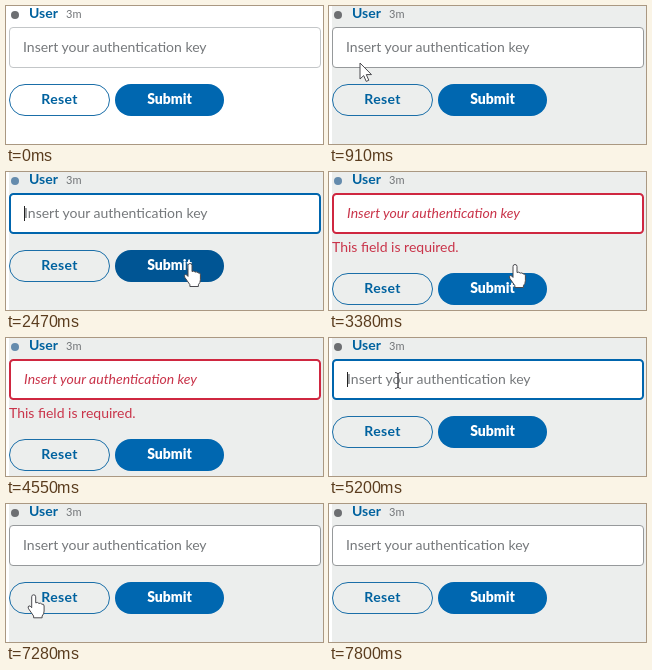
An HTML page for the animation above (8 s loop, 317 by 138 pixels).

```html
<!DOCTYPE html>
<html lang="en">
<head>
<meta charset="utf-8">
<title>Authentication form</title>
<style>
  html, body { margin: 0; width: 100%; height: 100%; overflow: hidden; background: #fff; }
  svg { display: block; font: 14px Lato, sans-serif; }
  .bold { font-weight: 700; fill: #00629f; }
  .mouse path { fill: #fff; stroke: #4a4a4f; stroke-linejoin: round; }
</style>
</head>
<body>
<svg width="317" height="138" viewBox="0 0 317 138">
  <rect id="hover" x="3" width="314" height="138" fill="#eceeed"/>
  <circle id="dot" cx="9" cy="9" r="4"/>
  <text class="bold" x="23" y="12">User</text>
  <text x="60" y="12" font-size="11" fill="#727578">3m</text>

  <rect id="field" fill="#fff"/>
  <text id="hint" y="46">Insert your authentication key</text>
  <path id="caret" d="M18.5 34V49" stroke="#222"/>
  <text id="error" x="3" y="80" fill="#c9344a">This field is required.</text>

  <g id="buttons">
    <rect x="3.5" y="78.5" width="100" height="31" rx="15.5" fill="none" stroke="#1a6ea8"/>
    <text class="bold" x="53.5" y="98" text-anchor="middle" letter-spacing=".3">Reset</text>
    <rect id="submit" x="109" y="78" width="109" height="32" rx="16"/>
    <text x="163.5" y="98" text-anchor="middle" font-weight="900" fill="#fff">Submit</text>
  </g>

  <g id="mouse" class="mouse">
    <path id="arrow" d="M0 0V16L3.7 12.6 6.2 18.4 8.8 17.3 6.3 11.6H11.5Z"/>
    <path id="hand" d="M-2 1.5a2 2 0 0 1 4 0V7.5q2-1 3.2.6 2-.8 3 .8 2.2-.4 2.2 1.8v5q0 3-2 5v1.8h-8.5v-1.8l-5-7.2q-1.2-2.2.3-2.9 1.2-.4 2.8 1.8z"/>
    <path id="beam" d="M-3-8Q0-8 0-6V6Q0 8-3 8M3-8Q0-8 0-6V6Q0 8 3 8" style="fill:none"/>
  </g>
</svg>
<script>
  const LOOP = 8000, STEP = 130;
  const $ = id => document.getElementById(id);
  const within = (t, a, b) => t >= a && t < b;
  const show = (id, on) => $(id).setAttribute('visibility', on ? 'visible' : 'hidden');
  const set = (id, attrs) => {
    for (const key in attrs) $(id).setAttribute(key, attrs[key]);
  };

  // Pointer visits: each row is time, x, y
  const visits = [
    [[520, 8, 118], [910, 31, 57], [1300, 58, 43], [1430, 62, 42], [1820, 62, 42],
     [2470, 184, 92], [2990, 184, 92], [3380, 186, 93], [3770, 186, 93], [4550, 262, -24]],
    [[4680, 110, -24], [5070, 72, 42], [5330, 66, 43], [5980, 66, 43], [6500, 43, 98],
     [7150, 43, 98], [7540, -16, 72]]
  ];

  function pointer(t) {
    const path = visits.find(v => within(t, v[0][0], v[v.length - 1][0]));
    if (!path) return null;
    const i = path.findIndex(k => k[0] > t);
    const [t0, x0, y0] = path[i - 1], [t1, x1, y1] = path[i];
    const p = (t - t0) / (t1 - t0), e = p * p * (3 - 2 * p);
    return [x0 + (x1 - x0) * e, y0 + (y1 - y0) * e];
  }

  function drawField(hovered, focused, failed) {
    const wide = focused || failed, w = wide ? 2 : 1;
    set('field', {
      x: 3 + w / 2, y: 21 + w / 2, width: 312 - w, height: 41 - w, rx: 3.5,
      'stroke-width': w,
      stroke: failed ? '#cf2740' : focused ? '#0065ad' : hovered ? '#96999b' : '#c3c6c8'
    });
    set('hint', {
      x: wide ? 18 : 17,
      fill: failed ? '#c9344a' : '#75787b',
      'font-style': failed ? 'italic' : 'normal'
    });
  }

  function drawMouse(pos) {
    show('mouse', pos);
    if (!pos) return null;
    const [x, y] = pos;
    const button = y < 78 || y > 133 ? null
      : within(x, 3, 104) ? 'reset' : within(x, 109, 218) ? 'submit' : null;
    const kind = button ? 'hand' : within(y, 22, 55) ? 'beam' : 'arrow';
    set('mouse', { transform: `translate(${x.toFixed(1)} ${y.toFixed(1)})` });
    for (const id of ['arrow', 'hand', 'beam'])
      set(id, { display: id === kind ? 'inline' : 'none' });
    return button;
  }

  function render(time) {
    const t = Math.floor((time + 1) / STEP) * STEP;
    const hovered = t >= 520;
    const failed = within(t, 2860, 5070);
    const focused = within(t, 1820, 2860) || within(t, 5070, 7280);

    show('hover', hovered);
    show('error', failed);
    show('caret', within(t, 1820, 2730) || within(t, 5070, 5590) || within(t, 6110, 6630));
    set('dot', { fill: within(t, 1820, 5070) ? '#648bad' : '#6d6f72' });
    drawField(hovered, focused, failed);
    set('buttons', { transform: `translate(0 ${failed ? 23 : 0})` });

    const over = drawMouse(pointer(t));
    set('submit', { fill: over === 'submit' && !failed ? '#005594' : '#0067b0' });
  }

  const start = performance.now();
  function tick() {
    render((performance.now() - start) % LOOP);
    requestAnimationFrame(tick);
  }
  tick();
</script>
</body>
</html>
```
